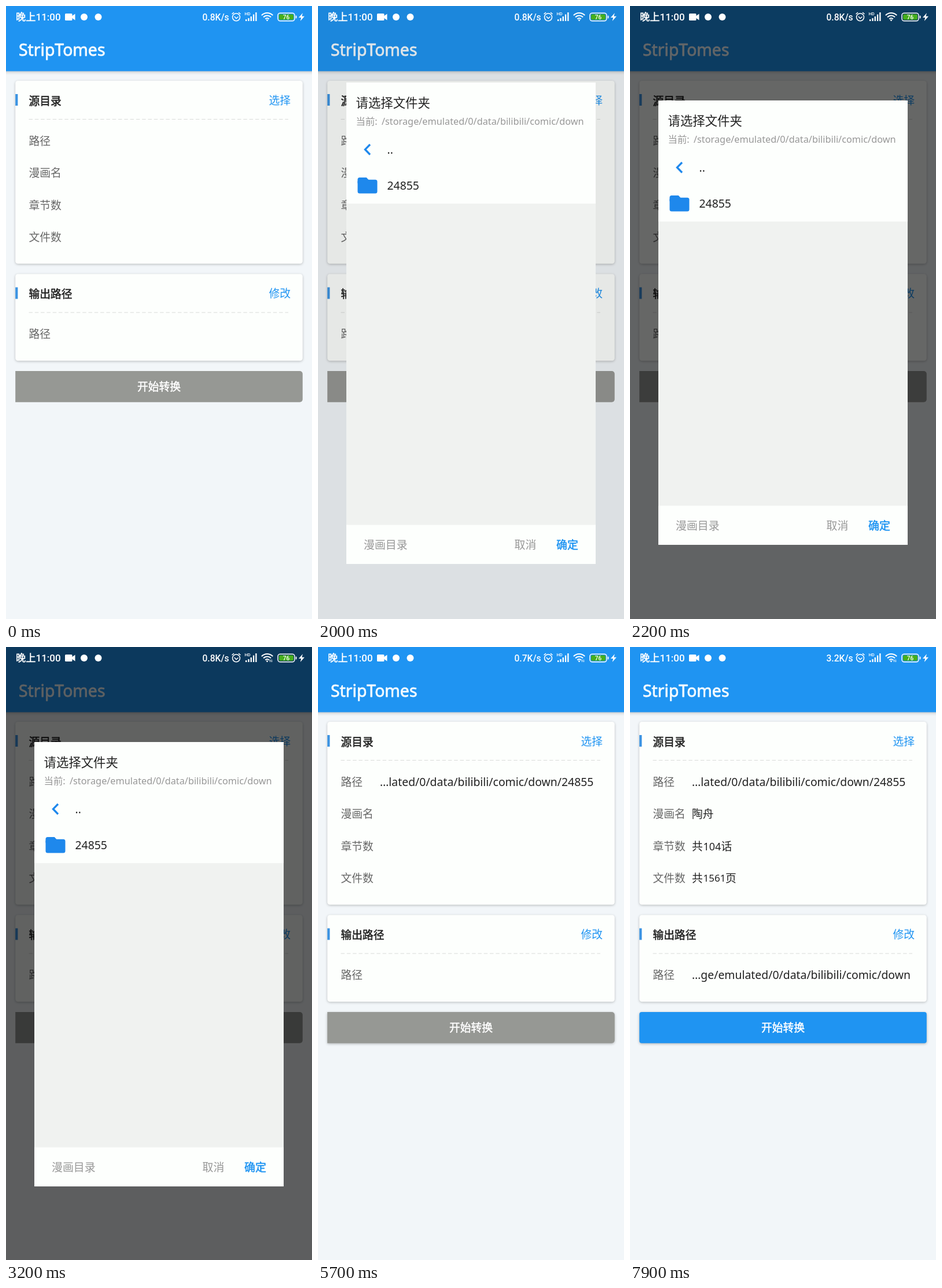
An HTML page with a canvas for the animation above (8 s loop, 529 by 1058 pixels).

```html
<!DOCTYPE html>
<html lang="zh-CN">
<head>
<meta charset="utf-8">
<title>StripTomes</title>
<style>
html, body { margin: 0; width: 100%; height: 100%; overflow: hidden; background: #f2f6f9; }
canvas { display: block; }
</style>
</head>
<body>
<canvas id="stage" width="529" height="1058"></canvas>
<script>
const ctx = document.getElementById('stage').getContext('2d');
const W = 529, H = 1058, LOOP = 8000, STEP = 100;
const LEFT = 16.2, WIDE = 496.6;
const BLUE = '#1f94f2', PAPER = '#fdfffd', INK = '#222', LABEL = '#666', MUTED = '#979797';
const SANS = '"Noto Sans", "Noto Sans CJK SC", "Noto Sans CJK", sans-serif';
const BAR = 'Roboto, "Noto Sans CJK SC", "Noto Sans CJK", sans-serif';
const TAIL = '/0/data/bilibili/comic/down';
const FOLDERS = ['227965', '227969', '227993', '227999', '228006', '228013', '228019', '228023', '228027'];
const SHOW = 2000, ENTER = 4300, CLOSE = 5700, LOADED = 7000;
const MEDIUM = { stroke: 0.55 };
const STATUS = { weight: 500, family: BAR };

// cy is the optical middle of the line; stroke thickens regular glyphs to a medium weight
function text(str, x, cy, size, color, { weight = 400, family = SANS, align = 'left', stroke = 0 } = {}) {
  const y = cy + size * 0.37;
  ctx.font = `${weight} ${size}px ${family}`;
  ctx.textAlign = align;
  ctx.fillStyle = color;
  ctx.fillText(str, x, y);
  if (stroke) {
    ctx.lineWidth = stroke;
    ctx.lineJoin = 'round';
    ctx.strokeStyle = color;
    ctx.strokeText(str, x, y);
  }
}

function rect(x, y, w, h, color) {
  ctx.fillStyle = color;
  ctx.fillRect(x, y, w, h);
}

function round(x, y, w, h, r, color) {
  ctx.beginPath();
  ctx.roundRect(x, y, w, h, r);
  ctx.fillStyle = color;
  ctx.fill();
}

function poly(points, color) {
  ctx.beginPath();
  points.forEach(([x, y]) => ctx.lineTo(x, y));
  ctx.closePath();
  ctx.fillStyle = color;
  ctx.fill();
}

function line(points, width, color) {
  ctx.beginPath();
  points.forEach(([x, y]) => ctx.lineTo(x, y));
  ctx.lineWidth = width;
  ctx.lineJoin = 'miter';
  ctx.strokeStyle = color;
  ctx.stroke();
}

function arc(x, y, r, a, b, width) {
  ctx.beginPath();
  ctx.arc(x, y, r, a, b);
  ctx.lineWidth = width;
  ctx.strokeStyle = '#fff';
  ctx.stroke();
}

function shadowed(blur, dy, alpha, draw) {
  ctx.save();
  ctx.shadowColor = `rgba(0,0,0,${alpha})`;
  ctx.shadowBlur = blur;
  ctx.shadowOffsetY = dy;
  draw();
  ctx.restore();
}

function card(y, h, title, action) {
  shadowed(4, 1.2, 0.24, () => round(LEFT, y, WIDE, h, 4.5, PAPER));
  rect(LEFT, y + 23, 4.2, 20, '#3b93e2');
  text(title, 39.5, y + 35, 18.8, INK, MEDIUM);
  text(action, 454.5, y + 34, 18.8, BLUE);
  ctx.save();
  ctx.setLineDash([6.5, 3.8]);
  line([[39.5, y + 66.5], [488, y + 66.5]], 1.2, '#d9dbd9');
  ctx.restore();
}

function count(num, unit, cy, size, unitX) {
  text('共', 107, cy, 18.8, INK);
  text(num, 126.5, cy, size, INK);
  text(unit, unitX, cy, 18.8, INK);
}

function page(t) {
  const chosen = t >= CLOSE, loaded = t >= LOADED;
  rect(0, 0, W, H, '#f2f6f9');
  shadowed(5, 1.2, 0.22, () => rect(-10, -10, W + 20, 122.5, BLUE));
  text('StripTomes', 22, 75.5, 28.4, '#f4fbff', { stroke: 0.8 });

  card(129, 315.7, '源目录', '选择');
  ['路径', '漫画名', '章节数', '文件数'].forEach((s, i) => text(s, 39.5, 233 + i * 55.4, 18.8, LABEL));
  card(462.5, 149.7, '输出路径', '修改');
  text('路径', 39.5, 566.5, 18.8, LABEL);

  if (chosen) text('…lated' + TAIL + '/24855', 107, 232.5, 19.4, INK);
  if (loaded) {
    text('陶舟', 107, 288.5, 18.8, INK);
    count('104', '话', 344, 18, 157.5);
    count('1561', '页', 399, 17, 165);
    text('…ge/emulated' + TAIL, 107, 566, 19.4, INK);
  }

  const button = () => round(LEFT, 630, WIDE, 53.8, loaded ? 4 : [0, 5, 5, 0], loaded ? BLUE : '#969894');
  if (loaded || (chosen && t < CLOSE + STEP)) shadowed(4, 1.2, 0.28, button);
  else button();
  text('开始转换', 264.5, 657.5, 18.8, '#fff', { ...MEDIUM, align: 'center' });
}

function folder(cy) {
  round(68.5, cy - 14, 17, 12, 3.5, '#1e88ec');
  poly([[80, cy - 14], [83.5, cy - 14], [87.5, cy - 10], [80, cy - 10]], '#1e88ec');
  round(68.5, cy - 10.2, 34, 23.8, 3.5, '#1e88ec');
}

function dialog(t) {
  const k = Math.min(3, Math.floor((t - SHOW) / STEP));
  const top = [132, 158, 163, 164][k], h = k ? 767 : 831;
  const inside = t >= ENTER;
  const rows = inside ? FOLDERS : ['24855'];
  const foot = top + h - 67.5;
  rect(0, 0, W, H, `rgba(0,0,0,${[0.09, 0.455, 0.595, 0.615][k]})`);
  rect(49, top, 431, h, PAPER);
  if (!inside) rect(49, top + 209, 431, foot - top - 209, '#f0f2f0');

  text('请选择文件夹', 65.5, top + 35, 21.4, INK);
  text('当前:', 65.5, top + 67, 16.4, MUTED);
  text(inside ? '…emulated' + TAIL + '/24855' : '/storage/emulated' + TAIL, 110, top + 66.5, 16.3, MUTED);

  line([[90, top + 107], [81.5, top + 115.7], [90, top + 124.5]], 3.3, '#1e88ec');
  text('..', 119.5, top + 115.5, 19.4, INK);
  rows.forEach((name, i) => {
    const cy = top + 178 + i * 62.2;
    folder(cy);
    text(name, 119.5, cy, 19.4, INK);
  });

  text('漫画目录', 79, top + h - 33, 18.9, inside ? INK : MUTED);
  text('取消', 339.5, top + h - 33, 18.9, MUTED);
  text('确定', 412, top + h - 33, 18.9, BLUE, MEDIUM);
}

function status(t) {
  const white = '#fff';
  text('晚上', 17, 19, 17.3, white, MEDIUM);
  text('11:00', 51.5, 19, 17, white, STATUS);
  round(102, 13, 12.5, 12, 1.5, white);
  poly([[113, 18], [119.5, 13.5], [119.5, 24.5], [113, 20]], white);
  round(129, 13, 12, 12, 6, white);
  round(153.5, 13, 12, 12, 6, white);

  const speed = t < 3800 ? '0.8' : t < 7800 ? '0.7' : '3.2';
  text(speed + 'K/s', 339.5, 19, 15.6, white, STATUS);

  // alarm clock
  arc(398, 19.3, 6.5, 0, Math.PI * 2, 1.5);
  line([[394.8, 18], [398, 21.5], [401.5, 18.5]], 1.4, white);
  line([[390.5, 14], [394, 11.2]], 1.5, white);
  line([[402, 11.2], [405.5, 14]], 1.5, white);

  text('HD', 412.5, 13.3, 7.5, white, STATUS);
  [3, 5, 8, 11.5, 15].forEach((h, i) => rect(414 + i * 4.3, 26 - h, 2.3, h, white));

  // wifi, with traffic arrows later on
  const up = -Math.PI / 2;
  [4.5, 9, 13.5].forEach(r => arc(451.5, 25.5, r, up - 0.8, up + 0.8, 2));
  poly([[451.5, 26.5], [449.2, 23.6], [453.8, 23.6]], white);
  if (t >= 3200) {
    poly([[455.2, 23.2], [456.5, 21.5], [457.8, 23.2]], white);
    rect(456.1, 23, 0.9, 3, white);
    poly([[458, 24.4], [459.3, 26.2], [460.6, 24.4]], white);
    rect(458.9, 21.5, 0.9, 3, white);
  }

  // battery
  ctx.beginPath();
  ctx.roundRect(470, 12.2, 29, 13.6, 4);
  ctx.lineWidth = 1.5;
  ctx.strokeStyle = white;
  ctx.stroke();
  round(472, 14.2, 25, 9.6, 2, '#45ae1c');
  text('76', 484.5, 19, 10, white, { ...STATUS, align: 'center' });
  round(500.7, 16.5, 1.8, 5, 1, white);
  poly([[513, 12], [506, 20], [510.3, 20], [508.8, 26], [516, 17.7], [511.4, 17.7]], white);
}

function frame(now) {
  const t = Math.floor((now % LOOP) / STEP) * STEP;
  page(t);
  if (t >= SHOW && t < CLOSE) dialog(t);
  status(t);
  requestAnimationFrame(frame);
}
requestAnimationFrame(frame);
</script>
</body>
</html>
```
